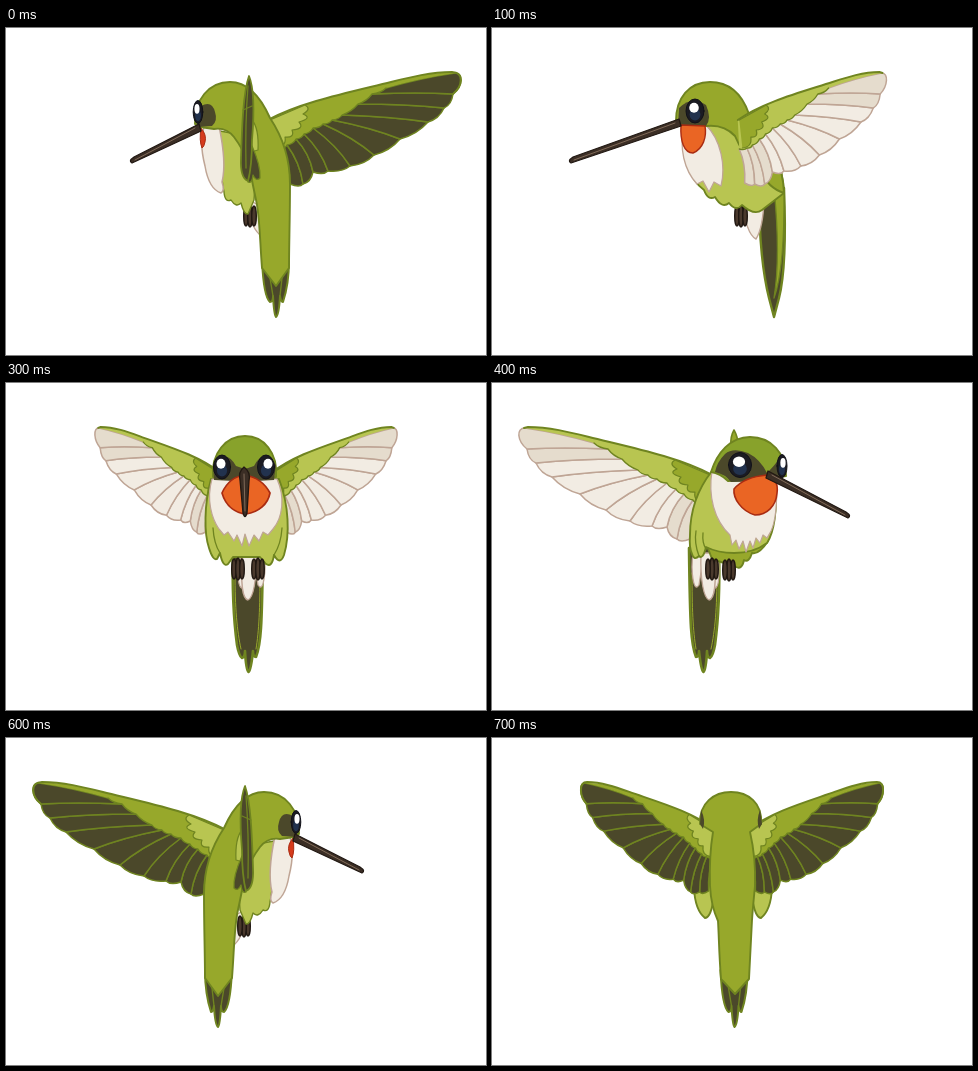
These frames come from a looping animation (480x327 px, 0.8 s). An HTML page:

```html
<!DOCTYPE html>
<html lang="en">
<head>
<meta charset="utf-8">
<title>Hovering hummingbird</title>
<style>
html, body { margin: 0; width: 100%; height: 100%; overflow: hidden; background: #fff; }
svg { display: block; width: 100vw; height: 100vh; }
path, ellipse { stroke-linejoin: round; stroke-linecap: round; vector-effect: non-scaling-stroke; }
.view { visibility: hidden; animation: turn 800ms step-end infinite; }
@keyframes turn {
  0% { visibility: visible; }
  12.5%, 100% { visibility: hidden; }
}
</style>
</head>
<body>
<svg id="stage" viewBox="0 0 480 327"></svg>
<script>
const EDGE = '#6f8420', GREEN = '#97a82b', HEAD = '#88a22b', LIGHT = '#b8c551', DARK = '#4b482a';
const CREAM = '#f2ece3', TAN = '#e5dccd', TAUPE = '#bfa595', ORANGE = '#ea6524', RUST = '#a92c12';
const BEAK = '#3b2e25', INK = '#1b1b22';

const path = (d, fill = 'none', stroke = EDGE, w = 1.9) =>
  `<path d="${d}" fill="${fill}" stroke="${stroke}" stroke-width="${w}"/>`;
const oval = (x, y, rx, ry, fill, stroke = 'none', w = 1) =>
  `<ellipse cx="${x}" cy="${y}" rx="${rx}" ry="${ry}" fill="${fill}" stroke="${stroke}" stroke-width="${w}"/>`;
const group = (t, s) => `<g transform="${t}">${s}</g>`;
const flip = (s, sum) => group(`translate(${sum} 0) scale(-1 1)`, s);

// Feathers run from the covert edge (roots) to the rim (tips).
const roots = [[380, 60], [366, 66], [352, 76], [336, 87], [326, 92], [317, 96], [307, 100], [298, 106], [290, 111], [281, 117], [274, 120], [264, 121]];
const tips = [[449, 45], [447, 66], [438, 80], [422, 94], [394, 111], [368, 127], [344, 138], [322, 143], [307, 144], [297, 156], [284, 156], [271, 155]];

function scallop(points, out) {
  return points.slice(1).map(([x, y], i) => {
    const [a, b] = points[i];
    return `Q${(x + a) / 2 + out},${(y + b) / 2 + out} ${x},${y}`;
  }).join('');
}

function wing(top) {
  let s = '';
  for (let i = tips.length - 2; i >= 0; i--) {
    const [a, b] = roots[i], [c, d] = tips[i], [e, f] = tips[i + 1], [g, h] = roots[i + 1];
    const bulge = i ? `Q${(c + e) / 2 + 3},${(d + f) / 2 + 4}` : 'C458,45 457,58';
    const mid = i ? `Q${(a + c) / 2 + 5},${(b + d) / 2 - 2}` : 'Q415,50';
    s += path(`M${a},${b}${mid} ${c},${d}${bulge} ${e},${f}Q${(e + g) / 2 + 5},${(f + h) / 2 - 2} ${g},${h}Z`,
      top ? DARK : i < 2 || i > 7 ? TAN : CREAM, top ? EDGE : TAUPE, 1.5);
  }
  s += path(`M262,92C295,74 345,64 385,54C405,49 425,44 449,45Q410,51 380,60${scallop(roots, 2)}Z`,
    top ? GREEN : LIGHT, 'none');
  s += path(`M380,60${scallop(roots, 2)}`, 'none', EDGE, 1.3);
  s += path('M262,92C295,74 345,64 385,54C405,49 425,44 446,44' + (top ? 'C458,44 457,58 447,66' : 'L450,45'), 'none', EDGE, 2);
  s += path('M264,92Q285,83 299,77Q306,81 297,86Q307,90 293,94Q299,101 286,102Q289,110 279,109Q281,119 268,120',
    top ? LIGHT : GREEN, EDGE, 1.2);
  return s;
}

const foot = (x, y) => [-4, 0, 4].map(k => oval(x + k, y, 2.3, 11 - Math.abs(k) / 4, '#4a392d', '#201711', 1.4)).join('');

const eye = (x, y, rx, ry, hx = x) =>
  oval(x, y, rx, ry, INK, '#111118') + oval(x, y + ry * .3, rx * .6, ry * .5, '#22324e') +
  oval(hx, y - ry * .27, rx * .53, ry * .42, '#fff');

const beak = (x, y, tx, ty) =>
  path(`M${x},${y - 3}L${tx + 3},${ty - 4}Q${tx - 3},${ty} ${tx + 1},${ty + 2}L${x + 2},${y + 4}Z`, BEAK, '#211812', 1.3) +
  path(`M${x - 4},${y + 1}L${tx + 4},${ty - 1}`, 'none', '#806a58', 1);

const tail = dx => group(`translate(${dx} 0)`,
  path('M255,165C254,205 256,240 259,262Q261,273 264,275Q267,274 267,268Q268,287 270.5,289Q273,287 275,268Q275,274 278,274C283,262 284,245 285,165Z', DARK, EDGE, 2.6) +
  path('M257,190C257,225 259,248 263,266M282,190C282,225 281,248 278,266', 'none', GREEN, 1));

const tailTips = dx => group(`translate(${dx} 0)`,
  path('M256,232C257,255 259,270 264,274Q267,274 267,268Q268,287 270,289Q273,287 274,268Q275,274 277,274C281,262 283,250 283,232Z', DARK, EDGE, 2) +
  path('M264,250L267,268M276,250L274,268', 'none', EDGE, 1.4));

const vent = dx => group(`translate(${dx} 0)`,
  path('M256,170Q253,204 259,205L263,195ZM270,170L275,202Q279,208 281,196Q283,185 281,170Z', CREAM, TAUPE, 1.3) +
  path('M260,170C257,202 260,216 265,217C270,215 274,198 273,170Z', CREAM, TAUPE, 1.3));

const backLeft = () => wing(true) +
  path('M243,172Q242,196 254,207L258,180Z', CREAM, TAUPE, 1.3) + foot(244, 188) +
  path('M214,103C214,125 215,150 218,164Q219,175 225,172Q230,180 235,175Q238,187 242,186L248,172L252,110Z', LIGHT, EDGE, 1.4) +
  path('M199,97C194,108 195,122 199,138C202,156 209,163 215,165Q219,163 216,154C220,138 216,112 213,98Z', CREAM, TAUPE, 1.5) +
  path('M195,100Q201,107 199,114Q198,119 196,120Q193,113 195,100Z', '#d63b1c', RUST, 1) +
  tailTips(0) +
  path('M189,96C188,72 203,54 224,54C244,54 256,72 264,90C276,108 284,130 284,156C284,190 283,218 283,240L270,258L256,240C254,215 254,195 251,177C249,166 246,155 244,140Q238,122 228,109Q220,99 208,101L194,99Z', GREEN) +
  path('M195,78Q206,72 209,84Q212,93 206,98L191,99Z', DARK, 'none') +
  beak(193, 99, 125, 133) + eye(192, 84, 4.8, 11.5, 191) +
  path('M246,92Q253,100 252,122L245,124Z', LIGHT, EDGE, 1.2) +
  path('M246,118Q255,138 254,150Q250,154 247,147Q246,156 242,154Z', DARK, EDGE, 1.3) +
  path('M243,48C248,60 248,88 246,112Q246,138 242,153Q234,150 235,130C236,100 237,65 243,48Z', DARK, EDGE, 1.8) +
  path('M242,58Q239,95 240,140M237,82L246,78', 'none', EDGE, 1.3);

const sideLeft = () =>
  path('M268,165C266,210 272,250 277,270L282,289L287,270C292,250 294,210 292,160Z', DARK, EDGE, 2.4) +
  path('M282,160C286,200 287,240 282,270Q293,240 292,160Z', GREEN, EDGE, 1.3) +
  path('M250,172Q254,206 264,211Q271,200 272,172Z', CREAM, TAUPE, 1.4) + foot(249, 188) +
  path('M191,98C190,130 198,152 212,162Q216,173 223,169Q230,181 237,175Q244,184 250,177Q262,188 270,182L292,165C291,135 277,108 257,86L215,96Z', LIGHT) +
  path('M192,98C187,120 192,142 205,156L211,153L217,164L222,154L229,158C234,138 229,112 214,97Z', CREAM, TAUPE, 1.3) +
  path('M184,93C184,70 197,54 218,54C238,54 250,66 257,86C276,108 291,135 292,165Q276,160 268,142Q250,126 243,108Q232,96 214,98Z', GREEN) +
  path('M187,80Q200,67 214,77Q220,90 214,98L186,97Z', DARK, 'none') +
  path('M189,97C188,113 192,125 201,125C211,121 215,109 213,98Z', ORANGE, RUST, 1.4) +
  beak(187, 94, 78, 133) + eye(203, 83, 9, 12, 202) +
  group('matrix(.77 0 0 1 44 0)', wing(false));

const frontLeft = () => wing(false) +
  path('M236,62Q236,54 240,47Q244,54 243,63Z', GREEN, EDGE, 1.6) +
  tail(0) + vent(0) +
  path('M206,158Q215,172 222,170Q225,180 230,177Q232,187 238,184L262,176L268,160Z', GREEN) +
  path('M198,97C197,125 199,148 207,160Q220,170 240,170Q256,170 268,164Q271,177 275,173Q280,178 282,171Q285,165 284,152C284,130 277,107 262,88Z', LIGHT) +
  path('M268,166Q272,160 271,150M275,173Q280,160 278,148', 'none', EDGE, 1.3) +
  path('M198,96C196,120 199,140 203,148L207,155L211,152L214,160L218,155L221,165L224,158L228,169L231,158L235,166L238,157L242,162L244,152C260,137 266,113 262,88Z', CREAM, TAUPE, 1.2) +
  path('M188,93C188,70 203,54 224,54C244,54 257,70 263,89Q254,90 246,98L206,96Z', HEAD) +
  path('M207,90Q214,76 226,70Q241,64 249,71Q257,79 259,89Q249,91 243,99L201,98Q188,96 189,88L195,76Q199,82 207,90Z', DARK, 'none') +
  path('M207,92Q195,96 197,110C198,123 207,132 219,132C233,128 241,115 240,106Q230,94 207,92Z', ORANGE, RUST, 1.6) +
  eye(192, 83, 5, 11.5, 191) + eye(234, 82, 11.5, 12.5, 235) + beak(206, 91, 125, 133) +
  foot(245, 187) + foot(262, 186);

const front = () => {
  const w = group('matrix(.644 0 0 .94 98 2.6)', wing(false));
  return w + flip(w, 480) + tail(-28) + vent(-23) +
    path('M205,96C198,122 198,150 203,165Q207,178 211,176L214,170Q217,185 222,181L227,174H254L260,181Q266,185 268,172Q274,183 278,172C284,152 283,122 273,96Z', LIGHT) +
    path('M207,145Q208,161 214,170M276,145Q275,161 268,172', 'none', EDGE, 1.3) +
    path('M206,96C200,117 206,136 213,146L218,152L222,149L228,158L231,152L236,163L239,151L243,163L248,152L253,158L257,149L262,152L267,146C277,134 279,114 271,96Z', CREAM, TAUPE, 1.2) +
    path('M207,94C205,70 220,53 239,53C258,53 272,70 270,94L239,98Z', HEAD) +
    path('M207,82Q220,65 230,83L239,86L248,83Q257,65 270,82L268,97L250,98H228L208,97Z', DARK, 'none') +
    path('M239,92Q223,94 216,110C220,124 230,130 240,131C253,129 262,121 264,110Q256,95 239,92Z', ORANGE, RUST, 1.7) +
    eye(216, 84, 8.5, 12, 215) + eye(260, 84, 8.5, 12, 262) +
    path('M238,84Q245,89 243,98L241,130Q239,137 237,130L234,97Q232,89 238,84Z', BEAK, '#211812', 1.3) +
    path('M238,91L239,128', 'none', '#806a58', 1) + foot(232, 186) + foot(252, 186);
};

const back = () => {
  const w = group('matrix(.695 0 0 .98 75 1)', wing(true));
  const lobe = path('M254,120L261,165Q264,180 269,180Q279,172 280,150L278,120Z', LIGHT);
  return lobe + flip(lobe, 482) + w + flip(w, 480) + tailTips(-27.5) +
    path('M208,86C207,65 222,54 239,54C256,54 271,65 269,86L258,94Q264,120 263,148Q261,168 260,182C259,205 258,225 257,241L243,256L229,241C227,215 227,200 226,183Q219,168 218,148Q217,118 221,94Z', GREEN) +
    path('M209,72Q214,82 211,91L208,86ZM268,72Q264,82 267,91L270,86Z', DARK, 'none');
};

const left = [backLeft(), sideLeft(), frontLeft()];
const right = left.map(s => flip(s, 482)).reverse();
const views = [...left, front(), ...right, back()];

document.getElementById('stage').innerHTML = views.map((s, i) =>
  `<g class="view" style="animation-delay:${i ? i * 100 - 800 : 0}ms">${s}</g>`).join('');
</script>
</body>
</html>
```
